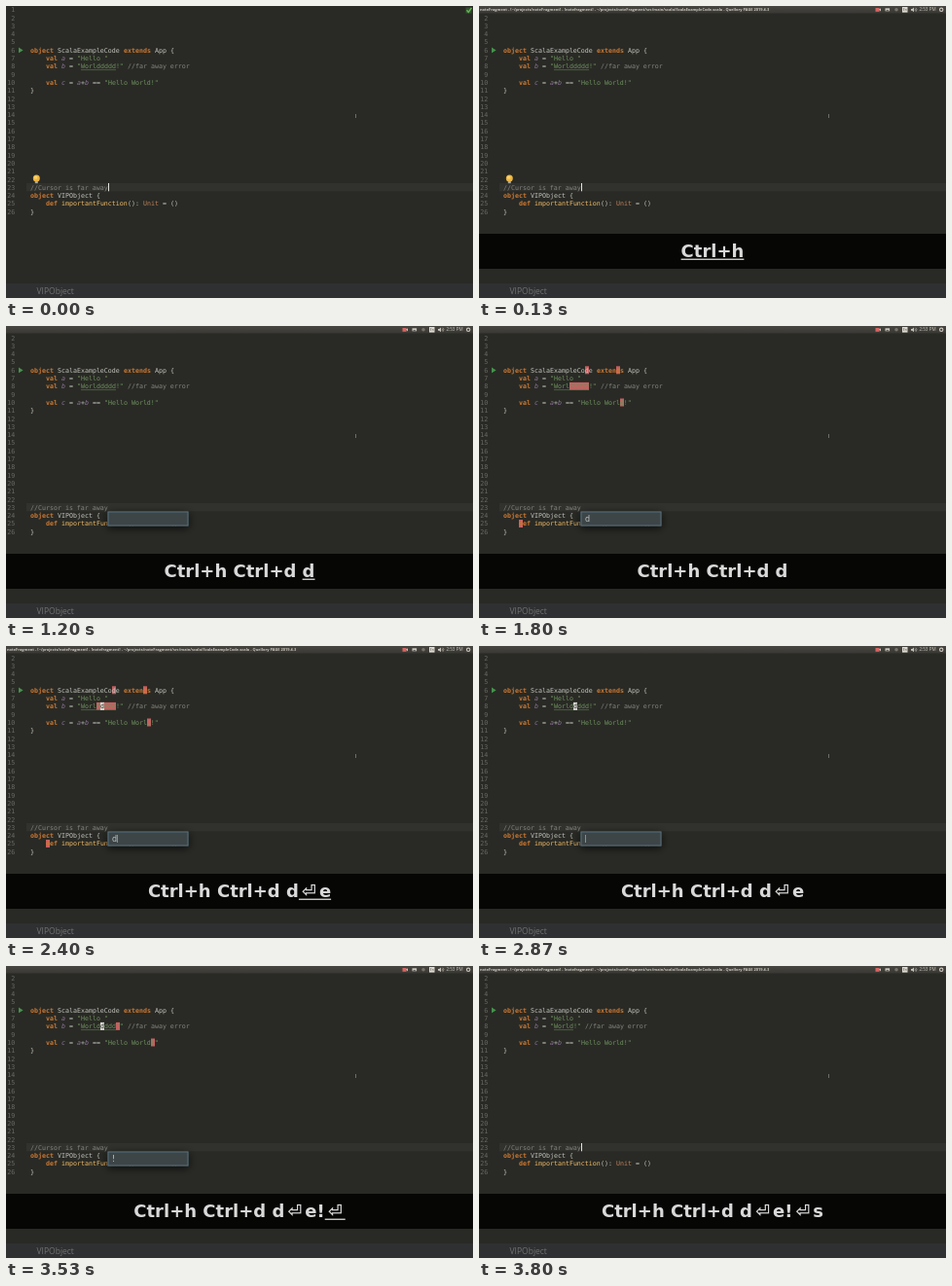
An HTML page with a canvas for the animation above (3940 ms loop, 480x300 px).

```html
<!DOCTYPE html>
<html lang="en">
<head>
<meta charset="utf-8">
<title>Jump and select</title>
<style>
html, body { margin: 0; width: 100%; height: 100%; overflow: hidden; background: #292a25; }
canvas { display: block; width: 480px; height: 300px; }
</style>
</head>
<body>
<canvas id="stage" width="480" height="300"></canvas>
<script>
const ctx = document.getElementById('stage').getContext('2d');
const LOOP = 3940;
const CHAR = 4, LEFT = 25, STEP = 8.3;
const MONO = '"DejaVu Sans Mono", monospace';
const SANS = '"DejaVu Sans", sans-serif';
const UI = '"Open Sans", "Noto Sans", sans-serif';
const RETURN = '\u23ce', RETURN_W = 21;

const styles = {
  k: ['#cc7832', 'bold'],
  n: ['#c3c4bd', ''],
  v: ['#8d7399', 'italic'],
  s: ['#6f9160', ''],
  c: ['#83847f', ''],
  f: ['#eebb69', ''],
  t: ['#b9805a', '']
};

// Style letter, then text, for each run of a line.
const code = {
  6: [['k', 'object '], ['n', 'ScalaExampleCode '], ['k', 'extends '], ['n', 'App {']],
  7: [['k', '    val '], ['v', 'a'], ['n', ' = '], ['s', '"Hello "']],
  10: [['k', '    val '], ['v', 'c'], ['n', ' = '], ['v', 'a'], ['n', '+'], ['v', 'b'],
       ['n', ' == '], ['s', '"Hello World!"']],
  11: [['n', '}']],
  23: [['c', '//Cursor is far away']],
  24: [['k', 'object '], ['n', 'VIPObject {']],
  25: [['k', '    def '], ['f', 'importantFunction'], ['n', '(): '], ['t', 'Unit'], ['n', ' = ()']],
  26: [['n', '}']]
};

// Line, column and length of each hit.
const hits = {
  d: [[6, 21, 1], [6, 29, 1], [8, 17, 5], [10, 30, 1], [25, 4, 1]],
  '!': [[8, 22, 1], [10, 31, 1]]
};

const K = 'Ctrl+h Ctrl+d';
const start = { keys: '', mark: 0, bar: false, title: false, bulb: true, caret: true,
                popup: false, blink: false, input: '', hits: '', block: false, word: 'Worlddddd!' };
const events = [
  [70, { keys: 'Ctrl+h', mark: 6, bar: true, title: true }],
  [200, { keys: K, mark: 6 }],
  [268, { bulb: false }],
  [334, { popup: true, caret: false, title: false }],
  [400, { blink: true }],
  [930, { blink: false, mark: 0 }],
  [1200, { keys: K + ' d', mark: 1 }],
  [1280, { input: 'd', blink: true }],
  [1360, { hits: 'd' }],
  [1800, { blink: false, mark: 0 }],
  [2270, { keys: K + ' d' + RETURN, mark: 1, blink: true }],
  [2336, { block: true }],
  [2400, { keys: K + ' d' + RETURN + 'e', mark: 2, title: true }],
  [2470, { popup: false, hits: '', input: '', blink: false }],
  [2665, { popup: true }],
  [2730, { title: false }],
  [2800, { blink: true }],
  [2870, { mark: 0 }],
  [2930, { keys: K + ' d' + RETURN + 'e!', mark: 1 }],
  [3000, { input: '!', blink: true }],
  [3070, { hits: '!' }],
  [3400, { mark: 0, blink: false }],
  [3470, { keys: K + ' d' + RETURN + 'e!' + RETURN, mark: 1 }],
  [3600, { popup: false, hits: '', title: true }],
  [3670, { keys: K + ' d' + RETURN + 'e!' + RETURN + 's', mark: 1 }],
  [3730, { word: 'World!', block: false, caret: true }],
  [3800, { mark: 0 }]
];

const stateAt = t => events.reduce((s, [at, change]) => t >= at ? Object.assign(s, change) : s,
                                   Object.assign({}, start));
const lineY = n => 45.3 + STEP * (n - 6);
const colX = c => LEFT + CHAR * c;

function rect(x, y, w, h, color) {
  ctx.fillStyle = color;
  ctx.fillRect(x, y, w, h);
}

function disc(x, y, r, color) {
  ctx.fillStyle = color;
  ctx.beginPath();
  ctx.arc(x, y, r, 0, Math.PI * 2);
  ctx.fill();
}

function shape(points, color) {
  ctx.fillStyle = color;
  ctx.beginPath();
  points.forEach(([x, y]) => ctx.lineTo(x, y));
  ctx.closePath();
  ctx.fill();
}

function stroke(points, color, width) {
  ctx.strokeStyle = color;
  ctx.lineWidth = width;
  ctx.beginPath();
  points.forEach(([x, y]) => ctx.lineTo(x, y));
  ctx.stroke();
}

function text(str, x, y, font, color, align = 'left') {
  ctx.font = font;
  ctx.fillStyle = color;
  ctx.textAlign = align;
  ctx.fillText(str, x, y);
}

function drawCode(n, runs) {
  let col = 0;
  for (const [kind, str] of runs) {
    const [color, face] = styles[kind];
    text(str, colX(col), lineY(n) + 2.4, `${face} 6.645px ${MONO}`, color);
    col += str.length;
  }
}

function drawEditor(s) {
  rect(0, 0, 480, 300, '#292a25');
  rect(21, 182, 459, 8.3, '#31322e');
  for (let n = 1; n <= 26; n++) {
    text(n, 9.3, lineY(n) + 2.4, `6.645px ${MONO}`, '#696a65', 'right');
  }
  shape([[13, 42.5], [17.6, 45.4], [13, 48.3]], '#46934c');

  for (const [n, col, len] of hits[s.hits] || []) {
    rect(colX(col), lineY(n) - 4, CHAR * len, 8, '#c75f61');
  }
  for (const n in code) drawCode(+n, code[n]);
  drawCode(8, [['k', '    val '], ['v', 'b'], ['n', ' = '], ['s', `"${s.word}"`],
               ['c', ' //far away error']]);

  const wave = [];
  for (let x = 77; x <= 77 + CHAR * (s.word.length - 1); x++) {
    wave.push([x, 65.6 + (x % 2 ? 0.4 : -0.4)]);
  }
  stroke(wave, '#587550', 0.7);

  if (s.block) {
    rect(colX(18), lineY(8) - 4, CHAR, 8, '#d6d6d1');
    text('d', colX(18), lineY(8) + 2.4, `6.645px ${MONO}`, '#30312d');
  }
  if (s.caret) rect(105, 182, 1, 8.3, '#e4e4df');
  if (s.bulb) {
    rect(29.8, 179, 3, 3.2, '#a9a9a2');
    disc(31.3, 177, 3.5, '#efb642');
    disc(30.7, 176.2, 1.6, '#f8d172');
  }
  stroke([[359.5, 111], [359.5, 115]], '#8e8f89', 0.7);

  rect(0, 285, 480, 15, '#2f3031');
  text('VIPObject', 31.5, 295.6, `8.5px ${UI}`, '#717273');
}

function drawBar(s) {
  const g = ctx.createLinearGradient(0, 0, 0, 7.5);
  g.addColorStop(0, '#474641');
  g.addColorStop(1, '#393834');
  rect(0, 0, 480, 7.5, g);
  if (s.title) {
    text('noteFragment - [~/projects/noteFragment] - [notefragment] - ' +
         '~/projects/noteFragment/src/main/scala/ScalaExampleCode.scala - Quellory PAGE 2019.4.3',
         1, 5.2, `bold 3.95px ${UI}`, '#cfcbc1');
  }
  const ink = '#c9c5bb';
  rect(407.5, 2, 4, 3.8, '#d86460');
  shape([[411, 3.8], [413, 2.2], [413, 5.5]], ink);
  rect(417.5, 2.3, 4.6, 3, ink);
  rect(418.5, 4, 2.6, 0.8, '#55534e');
  disc(429, 3.8, 1.8, '#77746d');
  rect(435, 1, 5.5, 5.6, '#dedad1');
  text('En', 437.8, 5.2, `3.4px ${UI}`, '#494843', 'center');
  shape([[444, 3], [445.3, 3], [447, 1.4], [447, 6.2], [445.3, 4.8], [444, 4.8]], ink);
  ctx.strokeStyle = ink;
  ctx.lineWidth = 0.6;
  for (const r of [1.5, 2.9]) {
    ctx.beginPath();
    ctx.arc(446.9, 3.8, r, -0.8, 0.8);
    ctx.stroke();
  }
  text('2:53 PM', 469.6, 5.3, `4.6px ${UI}`, ink, 'right');
  ctx.lineWidth = 1.1;
  ctx.beginPath();
  ctx.arc(475.2, 3.8, 1.7, 0, Math.PI * 2);
  ctx.stroke();
}

function drawPopup(s) {
  ctx.save();
  ctx.shadowColor = 'rgba(0,0,0,0.75)';
  ctx.shadowBlur = 8;
  ctx.shadowOffsetY = 2;
  rect(104.5, 190.5, 83, 15, '#3d4547');
  ctx.restore();
  ctx.strokeStyle = '#56717f';
  ctx.lineWidth = 1;
  ctx.strokeRect(105, 191, 82, 14);
  text(s.input, 109, 200.8, `8px ${SANS}`, '#c3c6c5');
  if (s.blink) rect(s.input ? 114 : 109, 194, 0.7, 8, '#a9aeae');
}

function drawKeys(s) {
  rect(0, 234, 480, 36, 'rgba(0,0,0,0.86)');
  const font = `bold 18px ${SANS}`;
  ctx.font = font;
  const runs = s.keys.split(/(\u23ce)/).filter(Boolean);
  const wide = str => str.split(/(\u23ce)/).reduce(
    (sum, run) => sum + (run === RETURN ? RETURN_W : ctx.measureText(run).width), 0);
  const width = wide(s.keys);
  let x = 240 - width / 2;
  if (s.mark) {
    const w = wide(s.keys.slice(-s.mark));
    rect(240 + width / 2 - w, 259.6, w, 1.3, '#d9d9d9');
  }
  for (const run of runs) {
    if (run === RETURN) text(run, x + RETURN_W / 2, 258, font, '#d9d9d9', 'center');
    else text(run, x, 258, font, '#d9d9d9');
    x += wide(run);
  }
}

function draw(t) {
  const s = stateAt(t);
  drawEditor(s);
  if (s.bar) drawBar(s);
  else {
    rect(472.5, 1.5, 6, 6, '#34512f');
    stroke([[473.5, 4.2], [475.3, 6.3], [478.5, 1.8]], '#63b552', 1.4);
  }
  if (s.popup) drawPopup(s);
  if (s.keys) drawKeys(s);
}

const began = performance.now();
function tick() {
  draw((performance.now() - began) % LOOP);
  requestAnimationFrame(tick);
}
tick();
</script>
</body>
</html>
```
